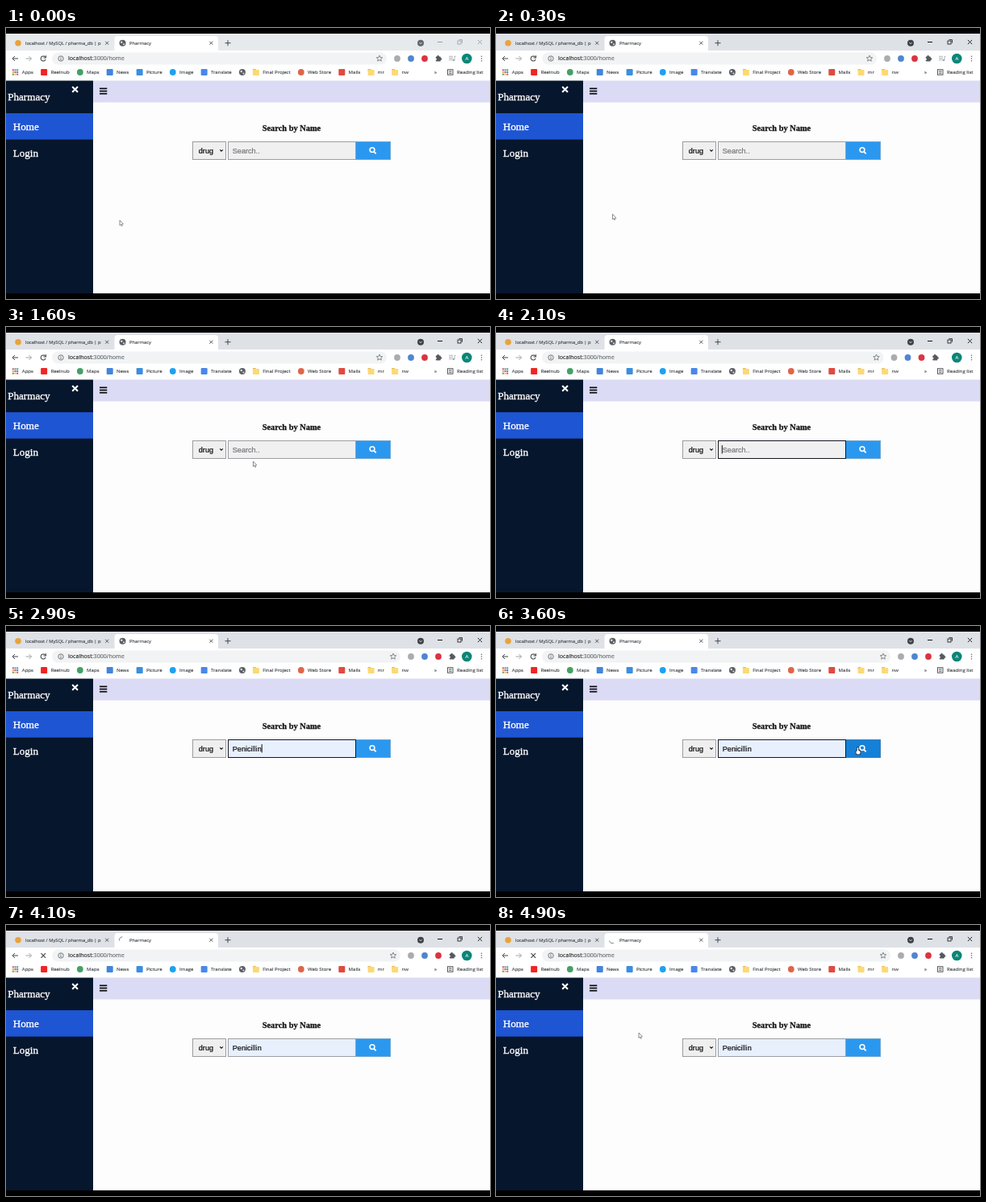
Animation of 600x337 px, one loop 5000 ms. Source, as an HTML page with a canvas:

```html
<!DOCTYPE html>
<html lang="en">
<head>
<meta charset="utf-8">
<title>Pharmacy</title>
<style>
html, body { margin: 0; width: 100%; height: 100%; overflow: hidden; background: #000; }
canvas { display: block; width: 600px; height: 337px; }
</style>
</head>
<body>
<canvas id="stage" width="600" height="337"></canvas>
<script>
const ctx = document.getElementById('stage').getContext('2d');
const LOOP = 5000, STEP = 100;
const UI = '"Open Sans", "Noto Sans", sans-serif';
const SERIF = '"Liberation Serif", "Noto Serif", serif';
const ARIAL = '"Liberation Sans", Arial, sans-serif';
const INK = '#44474b', GREY = '#686c71';

// Heights of the browser rows and the search row
const TAB_Y = 18.7, BAR_Y = 38, MARK_Y = 55, PAGE_Y = 65.5;
const SIDE_W = 108, ROW_Y = 141, ROW_H = 23;
const FIELD_X = 275, BUTTON_X = 433, ROW_END = 477;

// Moments of the story
const WAKE = 100, FOCUS = 1800, POPUP = 2100, PREVIEW = 2500, FILL = 2900;
const POPUP_END = 3100, HOVER = 3600, SUBMIT = 3900, RETURN = 4300;

// Pointer gestures; bend pushes the path sideways, most in its first half
const MOVES = [
  { at: 0, dur: 600, from: [141, 239], to: [148, 224], bend: [0, 0] },
  { at: 800, dur: 800, from: [152, 214], to: [306.5, 167], bend: [0, 155] },
  { at: 1600, dur: 300, from: [306.5, 167], to: [287, 164], bend: [0, -25] },
  { at: POPUP_END, dur: 500, from: [288, 170], to: [448.5, 151], bend: [0, 0] },
  { at: HOVER, dur: 300, from: [448.5, 151], to: [450, 160], bend: [0, 0] },
  { at: RETURN, dur: 500, from: [283, 118], to: [177, 134], bend: [-245, 0] }
];

function rect(x, y, w, h, fill) {
  ctx.fillStyle = fill;
  ctx.fillRect(x, y, w, h);
}
function round(x, y, w, h, r, fill) {
  ctx.beginPath();
  ctx.roundRect(x, y, w, h, r);
  ctx.fillStyle = fill;
  ctx.fill();
}
function frame(x, y, w, h, color, lw = 1) {
  ctx.strokeStyle = color;
  ctx.lineWidth = lw;
  ctx.strokeRect(x, y, w, h);
}
function dot(x, y, r, fill) {
  ctx.beginPath();
  ctx.arc(x, y, r, 0, 7);
  ctx.fillStyle = fill;
  ctx.fill();
}
function arc(x, y, r, from, to, color, lw) {
  ctx.beginPath();
  ctx.arc(x, y, r, from, to);
  ctx.strokeStyle = color;
  ctx.lineWidth = lw;
  ctx.stroke();
}
function line(color, lw, ...pts) {
  ctx.beginPath();
  for (let i = 0; i < pts.length; i += 2) ctx.lineTo(pts[i], pts[i + 1]);
  ctx.strokeStyle = color;
  ctx.lineWidth = lw;
  ctx.stroke();
}
function cross(x, y, r, color, lw) {
  line(color, lw, x - r, y - r, x + r, y + r);
  line(color, lw, x + r, y - r, x - r, y + r);
}
function bars(x, y, w, gap, lw, color) {
  for (let i = -1; i <= 1; i++) line(color, lw, x, y + i * gap, x + w, y + i * gap);
}
// Draws slightly emboldened text and returns its right edge
function text(str, x, y, size, color = INK, family = UI, weight = '') {
  ctx.font = `${weight} ${size}px ${family}`;
  ctx.fillStyle = ctx.strokeStyle = color;
  ctx.lineWidth = size / 40;
  ctx.fillText(str, x, y);
  ctx.strokeText(str, x, y);
  return x + ctx.measureText(str).width;
}

const circle = color => (x, y) => dot(x, y, 3.9, color);
const square = color => (x, y) => round(x - 4, y - 4, 8, 8, 1, color);
function folder(x, y) {
  round(x - 4, y - 4, 4, 3, 0.7, '#e9b949');
  round(x - 4, y - 3, 8, 7, 0.7, '#fbd975');
}
function globe(x, y) {
  dot(x, y, 4, '#5b5f64');
  dot(x - 1.2, y - 1, 1.2, '#dfe1e3');
  dot(x + 1.5, y + 1.5, 1, '#dfe1e3');
}
function apps(x, y) {
  const hues = ['#de5145', '#4b86dc', '#4b9f63', '#e9b43c'];
  for (let i = 0; i < 9; i++) {
    rect(x - 3.7 + i % 3 * 2.7, y - 3.7 + Math.floor(i / 3) * 2.7, 2, 2, hues[i % 4]);
  }
}
function star(x, y) {
  const pts = [];
  for (let i = 0; i <= 10; i++) {
    const a = i * Math.PI / 5 - Math.PI / 2, r = i % 2 ? 1.8 : 3.9;
    pts.push(x + r * Math.cos(a), y + r * Math.sin(a));
  }
  line(GREY, 0.8, ...pts);
}
function puzzle(x, y) {
  round(x - 3.2, y - 2.4, 6, 6, 0.8, '#55595e');
  dot(x - 0.4, y - 2.7, 1.3, '#55595e');
  dot(x + 3, y + 0.5, 1.3, '#55595e');
  dot(x - 3, y + 0.7, 1, '#fff');
}
function playlist(x, y) {
  bars(x - 4, y - 0.5, 5, 2.2, 0.9, '#a5a8ac');
  line('#a5a8ac', 0.9, x + 4.5, y - 2.7, x + 3, y - 2.7, x + 3, y + 2);
  dot(x + 2, y + 2, 1.2, '#a5a8ac');
}
function arrow(x, y, dir, color) {
  line(color, 1, x - 3.5, y, x + 3.5, y);
  line(color, 1, x + dir * 0.5, y - 3, x + dir * 3.5, y, x + dir * 0.5, y + 3);
}

const BOOKMARKS = [
  [apps, 'Apps'], [square('#ee2524'), 'Reelnub'], [circle('#43a163'), 'Maps'],
  [square('#4285dc'), 'News'], [square('#3b8ee0'), 'Picture'], [circle('#1da1f2'), 'Image'],
  [square('#4a87e8'), 'Translate'], [globe, ''], [folder, 'Final Project'],
  [circle('#df6548'), 'Web Store'], [square('#e04a3f'), 'Mails'], [folder, 'mr'], [folder, 'nw']
];
const EXTENSIONS = [circle('#a9acb0'), circle('#4f86d0'), circle('#dc3340'), puzzle];

function tabs(t) {
  const awake = t >= WAKE;
  const ctl = awake ? '#111' : '#999ca0';
  const base = TAB_Y + 2.2;
  rect(0, 7, 600, 22, awake ? '#dee1e6' : '#e7eaed');
  round(134.5, 10, 128.5, 19, [4, 4, 0, 0], '#fff');
  dot(15, TAB_Y, 3.8, '#e9a33c');
  text('localhost / MySQL / pharma_db | p', 24, base, 5.75);
  text('Pharmacy', 153, base, 5.8);
  for (const x of [125.2, 254.3]) cross(x, TAB_Y, 2, INK, 0.9);
  if (t < SUBMIT) globe(144.5, TAB_Y);
  else {
    const a = 6 - (t - SUBMIT) / STEP;
    arc(144.5, TAB_Y, 3.9, a - 1.05, a + 0.65, '#777b80', 1);
  }
  line(INK, 1, 271.5, TAB_Y, 278.5, TAB_Y);
  line(INK, 1, 275, TAB_Y - 3.5, 275, TAB_Y + 3.5);
  dot(514, TAB_Y, 4, awake ? '#3f4246' : '#63676b');
  line('#fff', 0.9, 512.5, 18.2, 514, 19.7, 515.5, 18.2);
  line(ctl, 1, 535, 17.5, 541, 17.5);
  frame(560, 16, 4, 4, ctl, 0.8);
  line(ctl, 0.8, 561.5, 14.6, 565.5, 14.6, 565.5, 18.6);
  cross(587.5, 17.5, 2.6, ctl, 0.9);
}

function toolbar(t) {
  const y = BAR_Y;
  // Icons slide right into the place of the playlist button
  const slide = 17 * Math.min(1, Math.max(0, (t - POPUP + STEP) / (2 * STEP)));
  rect(0, 28, 600, 38, '#fff');
  round(57, y - 7.5, 415 + slide, 15, 7.5, '#f1f3f4');
  arrow(11.5, y, -1, INK);
  arrow(28, y, 1, '#a0a3a7');
  if (t >= SUBMIT) cross(46.3, y, 2.8, INK, 1.1);
  else {
    arc(46.2, y, 3, 0.3, 5.5, INK, 1.1);
    line(INK, 1.2, 49.4, y - 3.8, 49.4, y - 1, 46.5, y - 1);
  }
  arc(68, y, 3.2, 0, 7, GREY, 0.9);
  line(GREY, 1, 68, y - 0.5, 68, y + 2);
  rect(67.5, y - 2.2, 1, 1, GREY);
  const end = text('localhost', 77, y + 2.4, 7.1, '#2a2c2f');
  text(':3000/home', end, y + 2.4, 7.1, GREY);

  star(463 + slide, y);
  EXTENSIONS.forEach((icon, i) => icon(485 + 17 * i + slide, y));
  if (!slide) playlist(553, y);
  dot(571.3, y, 6.3, '#0b8577');
  text('A', 569.4, y + 2.2, 6, '#fff');
  for (let i = -1; i <= 1; i++) dot(589.5, y + i * 2.7, 0.8, GREY);
}

function bookmarks() {
  const base = MARK_Y + 2.2;
  let x = 11.5;
  for (const [icon, label] of BOOKMARKS) {
    icon(x, MARK_Y);
    x = label ? text(label, x + 8.3, base, 6.05) + 13.2 : x + 17;
  }
  text('»', 531, base, 6.05);
  frame(547.5, MARK_Y - 3.3, 6.5, 6.5, INK, 0.9);
  bars(549, MARK_Y, 3.5, 1.6, 0.7, INK);
  text('Reading list', 559, base, 6.05);
}

function page(t) {
  rect(0, PAGE_Y, 600, 330 - PAGE_Y, '#fdfdfe');
  rect(SIDE_W, PAGE_Y, 600 - SIDE_W, 92.5 - PAGE_Y, '#dbdbf6');
  rect(0, PAGE_Y, SIDE_W, 330 - PAGE_Y, '#06162d');
  rect(0, 106, SIDE_W, 32.7, '#1e55d2');
  text('Pharmacy', 2.2, 90, 13.1, '#fff', SERIF);
  ['Home', 'Login'].forEach((s, i) => text(s, 8.7, 127.3 + 32.5 * i, 13.1, '#fff', SERIF));
  cross(85.6, 76.4, 3.4, '#fff', 2.1);
  bars(116, 78.5, 9.3, 3.2, 1.7, '#0b0b0f');
  text('Search by Name', 317.7, 128.3, 10.4, '#111', SERIF, 'bold');
  searchRow(t);
}

function box(x, right, fill, edge) {
  rect(x, ROW_Y, right - x, ROW_H, fill);
  frame(x + 0.5, ROW_Y + 0.5, right - x - 1, ROW_H - 1, edge);
}

function searchRow(t) {
  const focus = t >= FOCUS && t < SUBMIT;
  const hover = t >= HOVER && t < SUBMIT;
  const filled = t >= PREVIEW;
  const base = ROW_Y + 15, mid = ROW_Y + 10.6;

  box(231, 273, '#efeff0', '#9c9c9e');
  text('drug', 238.8, base, 9.1, '#0c0c0c', ARIAL);
  line('#111', 1.1, 265.2, mid - 0.3, 267, mid + 1.5, 268.8, mid - 0.3);

  box(BUTTON_X, ROW_END, hover ? '#1580d8' : '#2b98f0', hover ? '#3b7db4' : '#6aa5d2');
  box(FIELD_X, 434, filled ? '#e8f0fe' : '#f0f0f1', focus ? '#14161c' : '#9c9ea2');
  const start = FIELD_X + 5.8;
  const end = filled
    ? text('Penicillin', start, base, t < FILL ? 8.9 : 9.1, '#101014', ARIAL)
    : text('Search..', start, base, 9.1, '#77777a', ARIAL);
  const typing = t >= FILL && t < HOVER - 2 * STEP;
  if (typing || focus && !filled) rect(typing ? end : start - 1, base - 9, 1, 10.5, '#111');

  arc(454, mid, 2.9, 0, 7, '#fff', 1.6);
  line('#fff', 1.9, 456, mid + 2.1, 458.7, mid + 4.8);
}

function hand(x, y) {
  for (const [grow, color] of [[0.7, '#15202c'], [0, '#fff']]) {
    round(x - 0.8 - grow, y - grow, 1.6 + 2 * grow, 6 + 2 * grow, 1, color);
    round(x - 2 - grow, y + 4 - grow, 5 + 2 * grow, 4.6 + 2 * grow, 1.6, color);
  }
}
function beam(x, y) {
  line('#333', 0.9, x, y - 4.5, x, y + 4.5);
  for (const end of [-4.5, 4.5]) line('#333', 0.8, x - 1.5, y + end, x + 1.5, y + end);
}
function tip(x, y) {
  ctx.beginPath();
  ctx.moveTo(x, y);
  ctx.lineTo(x, y + 6.5);
  ctx.lineTo(x + 1.6, y + 5.2);
  ctx.lineTo(x + 2.8, y + 7.5);
  ctx.lineTo(x + 2.7, y + 5);
  ctx.lineTo(x + 4.4, y + 4.8);
  ctx.closePath();
  ctx.fillStyle = '#fff';
  ctx.strokeStyle = '#6d7075';
  ctx.lineWidth = 0.8;
  ctx.fill();
  ctx.stroke();
}

function pointer(t) {
  if (t >= POPUP && t < POPUP_END || t >= SUBMIT && t < RETURN) return;
  const { at, dur, from, to, bend } = MOVES.findLast(m => m.at <= t);
  const k = Math.min(1, (t - at) / dur);
  const push = Math.sin(Math.PI * k) * (1 - k);
  const [x, y] = from.map((v, i) => v + (to[i] - v) * k + bend[i] * push);
  const inRow = y > ROW_Y && y < ROW_Y + ROW_H;
  if (inRow && x > BUTTON_X && x < ROW_END) hand(x, y);
  else if (inRow && x > FIELD_X && x < BUTTON_X) beam(x, y);
  else tip(x, y);
}

function draw(now) {
  const t = Math.floor(now % LOOP / STEP) * STEP;
  rect(0, 0, 600, 337, '#000');
  tabs(t);
  toolbar(t);
  bookmarks();
  page(t);
  pointer(t);
}

const start = performance.now();
function tick() {
  draw(performance.now() - start);
  requestAnimationFrame(tick);
}
tick();
</script>
</body>
</html>
```
